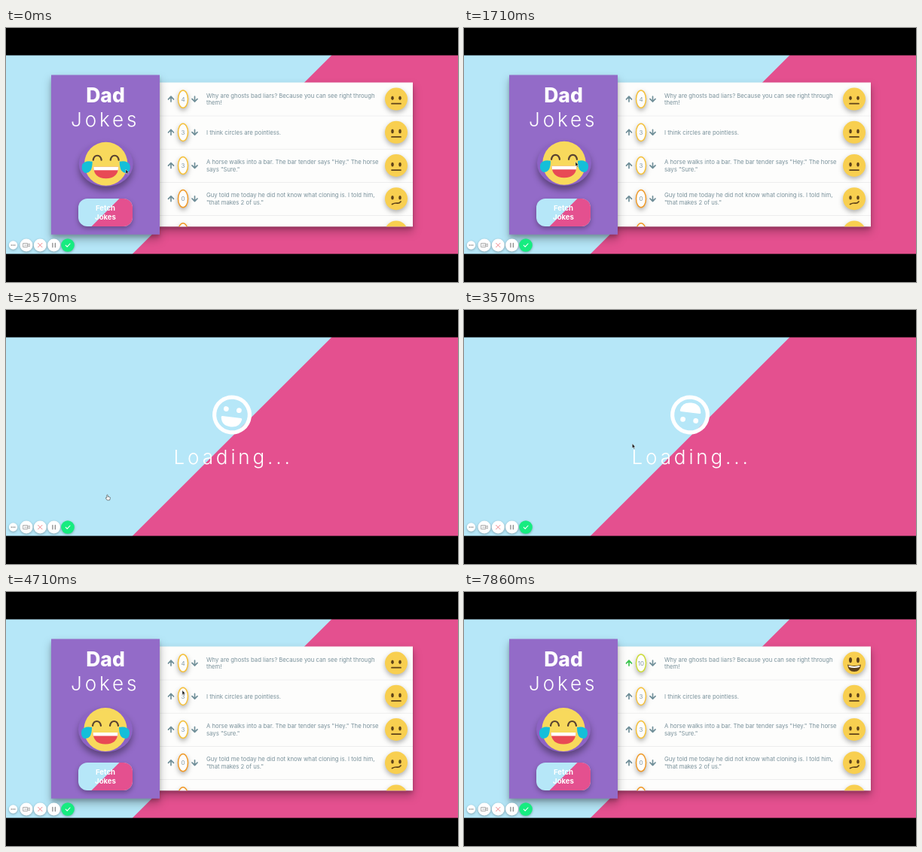
These frames come from a looping animation (600x338 px, 8 s). An HTML page:

```html
<!DOCTYPE html>
<html lang="en">
<head>
<meta charset="utf-8">
<title>Dad Jokes</title>
<style>
  html, body { margin: 0; width: 100%; height: 100%; overflow: hidden; background: #000; }
  svg { display: block; width: 600px; height: 338px; font-family: Inter, Roboto, sans-serif; }
  .line { fill: none; stroke-linecap: round; stroke-linejoin: round; }
  .panel { filter: drop-shadow(0 3px 2px rgba(0,0,0,.16)) drop-shadow(0 6px 6px rgba(0,0,0,.28)); }
  .lift { filter: drop-shadow(0 3px 3px rgba(0,0,0,.3)); }
  .float { filter: drop-shadow(0 6px 4.5px rgba(0,0,0,.36)); }
  .tool { filter: drop-shadow(0 1px 1.5px rgba(0,0,0,.3)); }
  .light { font-weight: 300; font-size: 26px; letter-spacing: 3.9px; fill: #fff; }
  .joke { font-size: 7.72px; fill: #78909a; }
  .score { font-size: 8px; fill: #8399a5; text-anchor: middle; }
  .bold { font-weight: 700; fill: #fff; text-anchor: middle; }
</style>
</head>
<body>
<svg id="stage" viewBox="0 0 600 338"></svg>
<script>
const STEPS = 56, RATE = 7;
const BLUE = '#b6e7f8', PINK = '#e4508f', SLATE = '#708f99', BROWN = '#5d4119';
const jokes = [
  [4, 'Why are ghosts bad liars? Because you can see right through', 'them!'],
  [3, 'I think circles are pointless.'],
  [3, 'A horse walks into a bar. The bar tender says "Hey." The horse', 'says "Sure."'],
  [0, 'Guy told me today he did not know what cloning is. I told him,', '"that makes 2 of us."'],
  [0, '']
];

const at = (x, y, body, attrs = '') => `<g transform="translate(${x} ${y})" ${attrs}>${body}</g>`;
const line = (d, color, width) => `<path class="line" d="${d}" stroke="${color}" stroke-width="${width}"/>`;
const disc = (x, y, rx, ry, fill) => `<ellipse cx="${x}" cy="${y}" rx="${rx}" ry="${ry}" fill="${fill}"/>`;
const box = (x, y, w, h, fill, r = 0) => `<rect x="${x}" y="${y}" width="${w}" height="${h}" rx="${r}" fill="${fill}"/>`;
const arrow = (x, y, dir, id = '') =>
  at(x, y, `<path ${id} class="line" stroke="${SLATE}" stroke-width="1.7" d="M0 ${-3.4 * dir}V${3.4 * dir}M-3.5 ${.2 * dir}L0 ${-3.4 * dir}L3.5 ${.2 * dir}"/>`);

const ringColor = n => n >= 9 ? '#cddc39' : n >= 6 ? '#ffeb3b' : n >= 3 ? '#f5c03a' : '#f09a28';

function face(n) {
  const big = n >= 9, ey = big ? -4 : -1.4;
  const eyes = [-5, 5].map(x => disc(x, ey, big ? 2 : 1.8, big ? 3.6 : 2.8, BROWN)).join('');
  const mouth = big
    ? `<path d="M-9 2Q0 5 9 2Q8 11.5 0 11.5T-9 2Z" fill="${BROWN}"/><path d="M-7.6 3.2Q0 5.4 7.6 3.2L7 5.4Q0 7.2-7 5.4Z" fill="#fff"/>`
    : line(n >= 6 ? 'M-6.5 4.5Q0 10 6.5 4.5' : n >= 3 ? 'M-6 6.1H6' : 'M-5.5 7.4Q-2 5.4 1 5.9T6 3.8', BROWN, 1.7);
  return disc(0, 0, 15, 15, '#f8cf50') + eyes + mouth;
}

function row([n, ...lines], i) {
  const y = 94.6 + i * 44.2, id = name => i ? '' : `id="${name}"`;
  const first = lines.length > 1 ? -1.8 : 3;
  return box(204, y + 22, 336, .8, '#eaeaea') +
    arrow(219, y, 1, id('up')) + arrow(250.5, y, -1) +
    `<ellipse ${id('ring')} class="lift" cx="235" cy="${y}" rx="6.5" ry="11.6" fill="#fdfdfc" stroke="${ringColor(n)}" stroke-width="1.5"/>` +
    `<text ${id('score')} class="score" x="235" y="${y + 2.9}">${n}</text>` +
    lines.map((s, k) => `<text class="joke" x="266" y="${y + first + k * 9.5}">${s}</text>`).join('') +
    at(518, y, face(n), 'class="lift" ' + id('mood'));
}

const eyeArc = x => line(`M${x - 5.5}-5Q${x - 4.5}-11 ${x}-11T${x + 5.5}-5`, '#594331', 2.2);
const tear = side => `<path transform="scale(${side} 1)" d="M18-3Q28-5 31.5 1Q33.5 8 29 11.5Q24 13.5 20.5 9Q18 5 18-3Z" fill="#14bfd9"/>`;
const mascot = disc(0, 0, 28.7, 29, '#f8d95c') + eyeArc(-11.5) + eyeArc(11.5) +
  '<path d="M-16.5 4H16.5Q16 19.5 0 19.5T-16.5 4Z" fill="#e84a55"/><path d="M-16.5 4H16.5L16 8.5H-16Z" fill="#fff"/>' +
  tear(-1) + tear(1);

const tool = (x, r, fill, body) => at(x, 289, disc(0, 0, r, r, fill) + body, 'class="tool"');
const toolbar =
  tool(9.5, 5.7, '#fff', [-2.2, 0, 2.2].map(x => disc(x, 0, .8, .8, '#777')).join('')) +
  tool(27, 8.5, '#fff', line('M-4-2.5H1.7V2.5H-4ZM1.7-.6L4.2-2V2L1.7 .6M-2.4 0H.2', '#999', .8)) +
  tool(45.3, 8.5, '#fff', line('M-2.7-2.7L2.7 2.7M2.7-2.7L-2.7 2.7', '#ee8a90', 1)) +
  tool(63.6, 8.5, '#fff', line('M-1.7-2.7V2.7M1.7-2.7V2.7', '#777', 1.1)) +
  tool(82, 8.8, '#16ec80', line('M-2.8 .2L-.8 2.2L3-2', '#fff', 1.1));

const stage = document.getElementById('stage');
stage.innerHTML = `
  <defs>
    <clipPath id="listClip">${box(204, 72.5, 336, 191.8, '#fff')}</clipPath>
    <clipPath id="buttonClip">${box(96, 227, 72, 37, '#fff', 12)}</clipPath>
  </defs>
  ${box(0, 36, 600, 265, BLUE)}
  <path d="M432.5 36H600V301H167.5Z" fill="${PINK}"/>
  <g id="app">
    <g class="panel">${box(200, 72.5, 340, 191.8, '#fdfdfc')}</g>
    <g clip-path="url(#listClip)">${jokes.map(row).join('')}</g>
    <g class="panel">${box(60, 62.5, 144, 212.3, '#936bc8')}</g>
    <text class="bold" x="132" y="99" font-size="26.5" style="font-weight:800">Dad</text>
    <text class="light" x="86" y="131">Jokes</text>
    <g id="mascot"><g class="float">${disc(0, 0, 36, 30, '#8d63c5')}</g>${mascot}</g>
    <g class="lift"><g clip-path="url(#buttonClip)">
      ${box(96, 227, 72, 37, BLUE)}<path d="M150.5 227H168V264H113.5Z" fill="${PINK}"/>
    </g></g>
    <text class="bold" x="132" y="243" font-size="9.6">Fetch</text>
    <text class="bold" x="132" y="254.6" font-size="9.6">Jokes</text>
  </g>
  <g id="loading">
    <g id="spinner" fill="#fff">
      <circle r="23.4" fill="none" stroke="#fff" stroke-width="5.2"/>
      <circle cx="-8.6" cy="-7" r="3.4"/><circle cx="8.6" cy="-7" r="3.4"/>
      <path d="M-12.5 3H12.5Q14.2 3 13.8 5Q12 16 0 16T-13.8 5Q-14.2 3-12.5 3Z"/>
    </g>
    <text class="light" x="222.5" y="205">Loading...</text>
  </g>
  ${box(0, 0, 600, 36.4, '#000')}${box(0, 300.6, 600, 38, '#000')}
  ${toolbar}
  <g id="cursor" stroke-width=".6" stroke-linejoin="round">
    <path id="pointer" d="M0-2V4L1.3 2.8L2.3 5L3.2 4.6L2.3 2.5H4Z" fill="#111" stroke="#fff" stroke-opacity=".7"/>
    <path id="hand" d="M-1.2 .2V-2.6Q-.5-3.6 .2-2.6V-.6L2.9 0Q3.5 .3 3.3 1.5L2.6 4H-.8L-2.8 1.2Q-2.4 .2-1.2 1Z" fill="#fff" stroke="#333"/>
  </g>`;

const $ = id => document.getElementById(id);
const show = (id, on) => $(id).setAttribute('visibility', on ? 'visible' : 'hidden');

// Keys are [step, ...values]; values between keys are interpolated linearly.
function track(keys, s) {
  const i = keys.findIndex(k => k[0] > s);
  if (i < 0) return keys[keys.length - 1].slice(1);
  const a = keys[i - 1], b = keys[i], p = (s - a[0]) / (b[0] - a[0]);
  return a.slice(1).map((v, j) => v + (b[j + 1] - v) * p);
}

const cursorPath = [[0, 159, 190], [4, 218, 105], [7, 216, 108], [12, 148, 180], [16, 135, 249],
  [20, 135, 249], [26, 241, 166], [31, 240, 150], [37, 222, 98], [39, 221, 96]];
const hover = [[0, .7], [2, 0], [10, 0], [12, 1], [14, 1], [16, 0]];
const clicks = [41, 44, 47, 49, 52, 54];
let shown = 4;

function draw(s) {
  const busy = s >= 18 && s < 26;
  const [x, y] = track(cursorPath, s), [lift] = track(hover, s);
  const score = 4 + clicks.filter(c => s >= c).length;

  show('app', !busy);
  show('loading', busy);
  $('spinner').setAttribute('transform', `translate(300 139.5) rotate(${7 + (s - 18) * 180 / RATE})`);
  $('mascot').setAttribute('transform', `translate(${132 + lift} ${183 - lift * 3.2})`);
  $('up').setAttribute('stroke', s < 38 ? SLATE : s < 41 ? '#8db047' : '#3cc44e');

  if (score !== shown) {
    shown = score;
    $('score').textContent = score;
    $('ring').setAttribute('stroke', ringColor(score));
    $('mood').innerHTML = face(score);
  }

  const hand = (s >= 16 && s < 21) || s >= 38, visible = s < STEPS - 1;
  $('cursor').setAttribute('transform', `translate(${x} ${y})`);
  show('pointer', visible && !hand);
  show('hand', visible && hand);
}

function tick(now) {
  draw(Math.floor(now * RATE / 1000 + .1) % STEPS);
  requestAnimationFrame(tick);
}
draw(0);
requestAnimationFrame(tick);
</script>
</body>
</html>
```
